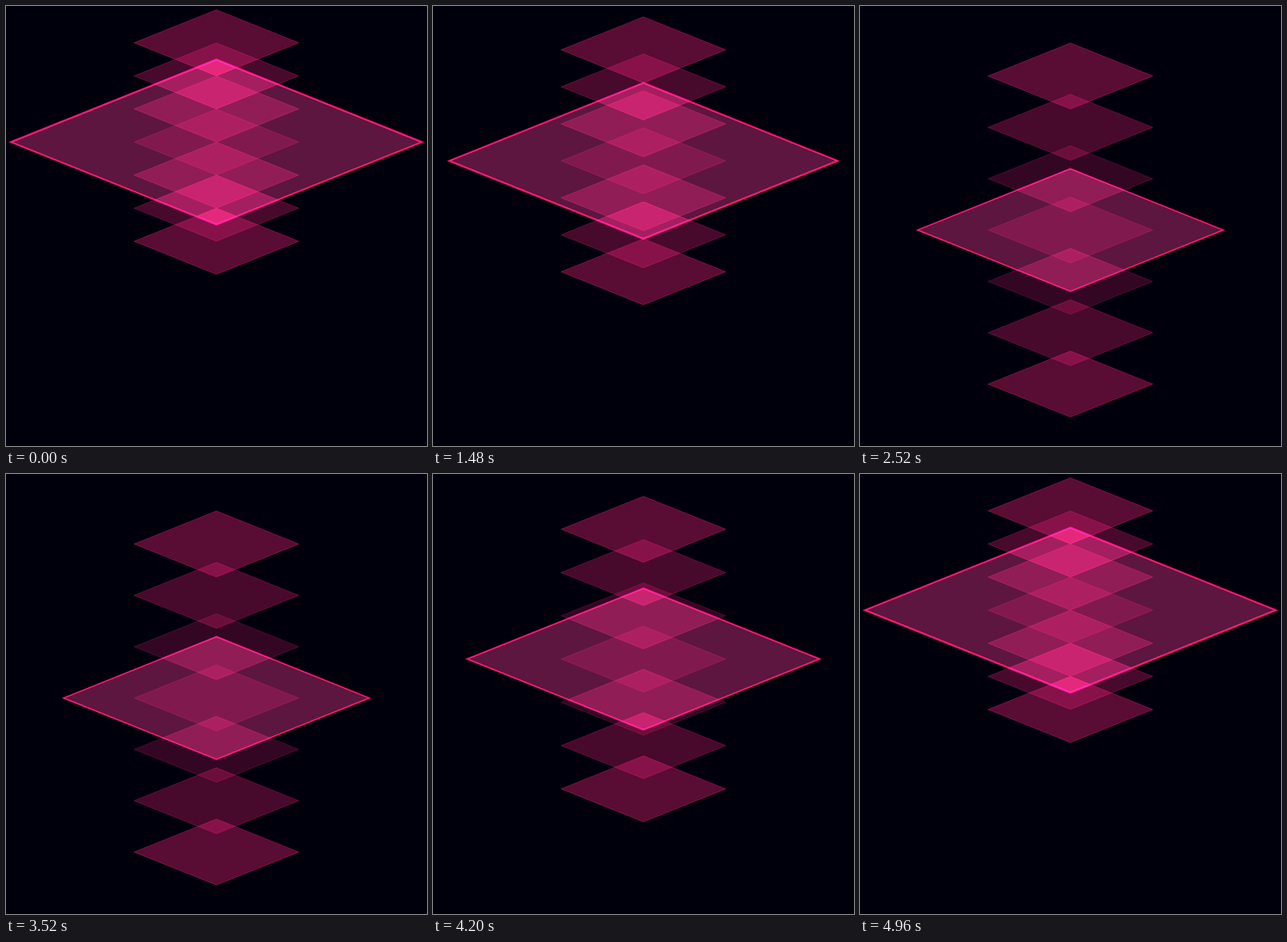
Write an HTML page with a canvas that moves like this. It is 491 px wide and 512 px high and loops after 5.06 s.

```html
<!DOCTYPE html>
<html lang="en">
<head>
<meta charset="utf-8">
<title>Stacked diamonds</title>
<style>
  html, body { margin: 0; width: 100%; height: 100%; overflow: hidden; background: #00000c; }
  canvas { display: block; }
</style>
</head>
<body>
<canvas id="stage" width="491" height="512"></canvas>
<script>
const ctx = document.getElementById('stage').getContext('2d');
const LOOP = 5060, STEP = 40;
const CENTER_X = 245.4;
const FLATTEN = 0.4;
const SMALL_HALF = 96;
const SMALL_ALPHAS = [0.137, 0.2, 0.28, 0.35]; // by distance from the middle

const mix = (a, b, p) => a + (b - a) * p;

// cubic-bezier(.42, 0, .58, 1)
function easeInOut(x) {
  if (x <= 0) return 0;
  if (x >= 1) return 1;
  let s = x;
  for (let i = 0; i < 6; i++) {
    const error = 1.26 * s - 0.78 * s * s + 0.52 * s ** 3 - x;
    s -= error / (1.26 - 1.56 * s + 1.56 * s * s);
  }
  return s * s * (3 - 2 * s);
}

function diamond(y, half, fill, stroke, lineWidth) {
  const h = half * FLATTEN;
  ctx.beginPath();
  ctx.moveTo(CENTER_X, y - h);
  ctx.lineTo(CENTER_X + half, y);
  ctx.lineTo(CENTER_X, y + h);
  ctx.lineTo(CENTER_X - half, y);
  ctx.closePath();
  ctx.fillStyle = fill;
  ctx.fill();
  ctx.strokeStyle = stroke;
  ctx.lineWidth = lineWidth;
  ctx.stroke();
}

function draw(time) {
  const spread = easeInOut((time - 1000) / 1500) - easeInOut((time - 3500) / 1500);
  const centerY = mix(158.3, 260.7, spread);
  const gap = mix(38.5, 59.75, spread);
  const bigHalf = mix(240, 178.5, spread);

  ctx.globalCompositeOperation = 'source-over';
  ctx.fillStyle = '#00000c';
  ctx.fillRect(0, 0, 491, 512);
  for (let i = -3; i <= 3; i++) {
    const color = `rgba(255, 35, 126, ${SMALL_ALPHAS[Math.abs(i)]})`;
    diamond(centerY + i * gap, SMALL_HALF, color, color, 1);
  }

  // The large diamond adds its light to the stack.
  ctx.globalCompositeOperation = 'lighter';
  diamond(centerY, bigHalf, 'rgb(93, 22, 51)', 'rgb(255, 10, 80)', 1.9 * bigHalf / 240);
}

function frame() {
  const time = performance.now() % LOOP;
  draw(Math.floor(time / STEP) * STEP);
  requestAnimationFrame(frame);
}
frame();
</script>
</body>
</html>
```
